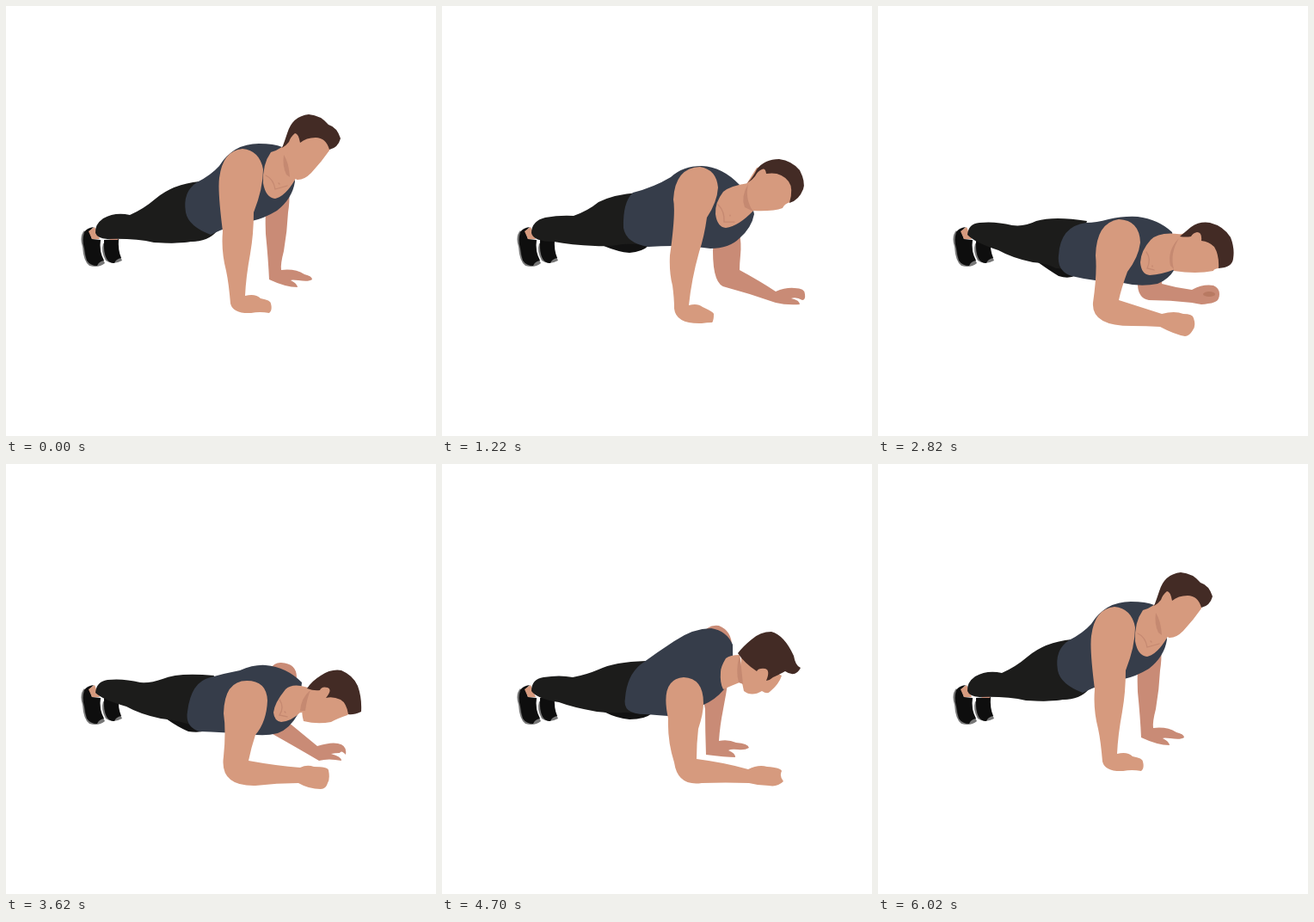
An HTML page without scripts for the animation above (6540 ms loop, 500 by 500 pixels).

```html
<!DOCTYPE html>
<html lang="en">
<head>
<meta charset="utf-8">
<title>Up-down plank</title>
<style>
html, body { margin: 0; width: 100%; height: 100%; overflow: hidden; background: #fff; }
svg { display: block; width: 100%; height: 100%; }
:root {
  --lower: cubic-bezier(.45,.2,.85,.8);
  --push: cubic-bezier(.5,.1,.8,.7);
  --settle: cubic-bezier(.2,.4,.5,1);
  --rise: cubic-bezier(.45,.1,.55,.95);
}
.move { animation: 6540ms linear infinite; }
.skin { fill: #d69a7e; }
.far-skin { fill: #c98b76; }
.shade { fill: #c58971; }
.pants { fill: #1c1c1b; }
.far-pants { fill: #121212; }
.shirt { fill: #363d4a; }
.hair { fill: #432b25; }
.shoe { fill: #0e0e0e; }
.sole { fill: #777; }
.collar { fill: none; stroke: #c58971; stroke-width: 1.3; stroke-linecap: round; }

#farArm { animation-name: far-arm; }
#farLeg { animation-name: far-leg; }
#leg { animation-name: leg; }
#torso { animation-name: torso; }
#chest { animation-name: chest; }
#collar { animation-name: collar; }
#face { animation-name: face; }
#jaw { animation-name: jaw; }
#hair { animation-name: hair; }
#arm { animation-name: arm; }
#fist { animation-name: fist; }

@keyframes far-arm {
  0%, 3.98%, 92.05%, to { d: path("M306 318Q305 295 302 265Q301 240 303 220Q308 200 325 202Q332 215 328 240Q327 262 323 285Q319 300 320 307Q336 305 347 312Q356 314 356 318Q352 321 340 319Q332 318 331 319Q338 322 339 327Q325 327 306 318Z"); animation-timing-function: var(--lower); }
  18.65% { d: path("M388 345Q360 335 330 327Q315 325 315 285Q316 250 335 240Q350 260 347 290Q346 300 346 307Q370 320 388 332Q400 327 410 328Q422 328 422 335Q423 342 419 342Q412 338 406 340Q416 342 416 347Q400 348 388 345Z"); }
  33.33% { d: path("M385 347Q360 345 330 346Q308 345 308 300Q312 270 325 260Q340 270 340 300Q339 315 340 323Q362 328 385 331Q396 325 404 327Q413 331 412 337Q413 343 408 344Q404 347 400 347Q396 348 394 347Q390 347 385 347Z"); }
  43.12% { d: path("M365 345Q340 342 315 342Q303 340 302 325Q300 300 310 290Q330 300 330 320Q330 320 330 323Q348 328 365 330Q378 323 390 325Q397 328 397 335Q397 342 392 344Q388 346 384 346Q380 347 376 347Q370 346 365 345Z"); animation-timing-function: var(--push); }
  55.35% { d: path("M364 345Q335 328 310 314Q290 300 300 260Q305 230 320 231Q338 232 338 248Q340 280 328 300Q345 314 362 328Q378 323 386 325Q397 327 395 338Q390 332 388 336Q383 336 378 337Q390 340 390 345Q375 342 364 345Z"); animation-timing-function: var(--settle); }
  71.87% { d: path("M307 338Q306 310 306 285Q296 240 302 200Q308 186 322 188Q337 194 337 212Q334 250 327 285Q323 305 322 322Q333 320 342 324Q356 325 357 330Q352 333 344 332Q336 331 333 333Q341 336 341 341Q330 341 307 338Z"); animation-timing-function: var(--rise); }
}
@keyframes far-leg {
  0%, 3.98%, 92.05%, to { d: path("M178 275Q200 277 222 273Q236 270 242 262L225 250Z"); animation-timing-function: var(--lower); }
  18.65% { d: path("M188 279Q205 286 218 287Q233 286 241 278L225 265Z"); }
  33.33% { d: path("M192 288Q205 299 220 299Q234 297 238 293L225 275Z"); }
  43.12% { d: path("M186 298Q200 308 210 314Q222 318 230 313L225 285Z"); animation-timing-function: var(--push); }
  55.35% { d: path("M186 296Q200 306 212 311Q224 313 232 310L225 285Z"); animation-timing-function: var(--settle); }
  71.87% { d: path("M188 288Q204 296 218 297Q236 297 244 290L225 275Z"); animation-timing-function: var(--rise); }
}
@keyframes leg {
  0%, 3.98%, 92.05%, to { d: path("M104 264Q103 254 113 247Q127 239 144 243Q160 236 174 224Q194 207 225 204L245 262Q235 274 215 274Q190 276 172 275Q150 270 118 271Q106 270 104 264Z"); animation-timing-function: var(--lower); }
  18.65% { d: path("M104 264Q104 250 120 246Q137 243 153 244Q170 238 182 228Q200 219 228 217L240 278Q225 276 210 277Q195 280 178 279Q150 278 130 274Q106 274 104 264Z"); }
  33.33% { d: path("M104 264Q104 252 118 249Q138 247 156 250Q168 246 182 239Q200 230 238 230L240 292Q225 288 210 288Q198 291 180 288Q152 283 136 277Q110 274 104 264Z"); }
  43.12% { d: path("M104 266Q105 253 118 252Q136 250 156 255Q170 257 184 250Q205 244 243 250L225 310Q215 305 207 305Q196 299 180 298Q156 293 140 284Q112 275 104 266Z"); animation-timing-function: var(--push); }
  55.35% { d: path("M104 266Q105 253 118 251Q136 249 156 254Q168 255 182 250Q200 242 242 246L225 306Q215 303 207 301Q196 298 180 296Q156 291 140 282Q112 274 104 266Z"); animation-timing-function: var(--settle); }
  71.87% { d: path("M104 264Q104 250 118 248Q137 245 152 248Q168 245 182 239Q200 230 237 229L240 291Q225 289 212 289Q198 290 180 288Q152 283 136 277Q110 273 104 264Z"); animation-timing-function: var(--rise); }
}
@keyframes torso {
  0%, 3.98%, 92.05%, to { d: path("M222 205Q238 197 248 186Q264 160 294 160Q312 160 321 164Q332 182 336 204Q333 224 315 238Q300 247 286 250Q260 255 238 266Q212 256 209 240Q205 216 222 205Z"); animation-timing-function: var(--lower); }
  18.65% { d: path("M222 217Q246 211 266 199Q280 186 302 186Q326 187 346 208Q360 222 363 242Q360 258 346 270Q334 282 312 282Q280 277 240 280Q214 276 211 258Q210 228 222 217Z"); }
  33.33% { d: path("M225 231Q248 228 264 222Q282 211 304 211Q330 212 350 236Q362 252 363 266Q360 282 350 292Q338 305 314 305Q290 300 238 293Q214 288 212 276Q212 246 225 231Z"); }
  43.12% { d: path("M242 252Q254 252 268 248Q286 244 302 245Q326 248 342 263Q346 285 345 306Q338 318 325 323Q305 327 285 322Q250 320 225 314Q208 308 210 290Q212 256 242 252Z"); animation-timing-function: var(--push); }
  55.35% { d: path("M238 248Q256 243 272 240Q288 233 302 234Q326 236 344 254Q342 275 340 290Q330 308 316 313Q300 317 285 314Q250 312 225 311Q208 306 211 288Q215 253 238 248Z"); animation-timing-function: var(--settle); }
  71.87% { d: path("M231 233Q250 219 270 206Q292 191 313 191Q331 194 338 210Q340 235 328 262Q318 274 304 280Q290 290 275 294Q250 292 236 291Q209 291 213 272Q215 246 231 233Z"); animation-timing-function: var(--rise); }
}
@keyframes chest {
  0%, 3.98%, 92.05%, to { d: path("M330 155Q322 166 308 170Q298 184 299 206Q302 223 313 224Q325 221 336 202Q342 195 345 190Z"); animation-timing-function: var(--lower); }
  18.65% { d: path("M356 206Q335 209 327 216Q317 229 318 242Q320 257 330 258Q345 256 362 238Q364 238 366 238Z"); }
  33.33% { d: path("M360 236Q337 237 328 244Q318 255 318 268Q320 284 332 286Q348 284 361 270Q364 271 366 270Z"); }
  43.12% { d: path("M362 267Q328 260 317 272Q306 284 305 298Q306 312 316 313Q330 312 343 307Q344 306 346 306Z"); animation-timing-function: var(--push); }
  55.35% { d: path("M362 264Q335 252 325 262Q312 278 311 289Q312 299 320 300Q332 299 342 289Q345 290 347 286Z"); animation-timing-function: var(--settle); }
  71.87% { d: path("M346 222Q335 222 330 226Q324 236 324 242Q323 255 327 262Q336 258 346 254Q349 255 350 250Z"); animation-timing-function: var(--rise); }
}
@keyframes collar {
  0%, 3.98%, 92.05%, to { d: path("M302 197Q311 201 313 213L327 209M317 206L318 207"); opacity: 1; animation-timing-function: var(--lower); }
  18.65% { d: path("M321 231Q329 239 328 251L340 251M335 243L335 244"); }
  33.33% { d: path("M321 259Q329 267 324 279L337 280M333 272L333 273"); }
  43.12% { d: path("M312 286Q318 294 313 305L321 307M319 302L319 303"); animation-timing-function: var(--push); }
  55.35% { d: path("M318 274Q324 283 318 292L327 294M324 288L325 289"); opacity: 1; animation-timing-function: var(--settle); }
  71.87% { d: path("M328 236Q329 245 328 250L331 251M330 247L330 248"); opacity: 0; animation-timing-function: var(--rise); }
}
@keyframes face {
  0%, 3.98%, 92.05%, to { d: path("M331 147Q348 142 365 152Q378 158 376 168Q367 181 355 194Q346 203 338 202Q326 190 328 170Z"); animation-timing-function: var(--lower); }
  18.65% { d: path("M366 188Q388 183 402 196Q411 210 405 228Q398 230 396 235Q385 239 362 238Q348 226 354 207Z"); }
  33.33% { d: path("M373 223Q394 220 405 232Q412 250 406 265Q398 266 395 272Q380 273 362 270Q350 255 357 238Z"); }
  43.12% { d: path("M367 261Q386 264 394 280Q400 290 396 305Q390 306 390 308Q370 312 344 308Q334 290 350 266Z"); animation-timing-function: var(--push); }
  55.35% { d: path("M368 257Q392 264 399 284Q400 290 397 292Q385 296 378 300Q362 303 346 299Q340 280 354 260Z"); animation-timing-function: var(--settle); }
  71.87% { d: path("M360 225Q380 240 395 246Q392 256 381 265Q378 268 372 264Q360 271 351 264Q346 245 348 222Z"); animation-timing-function: var(--rise); }
}
@keyframes jaw {
  0%, 3.98%, 92.05%, to { d: path("M323 173Q321 186 326 196L330 199Q329 182 323 173Z"); animation-timing-function: var(--lower); }
  18.65% { d: path("M356 207Q347 222 352 234L362 239Q352 225 356 207Z"); }
  33.33% { d: path("M357 238Q348 252 352 265L362 271Q353 255 357 238Z"); }
  43.12% { d: path("M350 270Q336 284 340 302L344 306Q339 288 350 270Z"); animation-timing-function: var(--push); }
  55.35% { d: path("M354 263Q343 272 342 287L348 287Q350 272 354 263Z"); animation-timing-function: var(--settle); }
  71.87% { d: path("M346 222Q341 240 345 254L350 256Q348 235 346 222Z"); animation-timing-function: var(--rise); }
}
@keyframes hair {
  0%, 3.98%, 92.05%, to { d: path("M321 165Q323 160 327 148Q333 128 352 126Q366 127 375 138Q385 141 389 154Q386 165 376 167Q372 153 360 153Q349 153 342 159Q340 148 336 148Q331 152 329 158Q325 163 321 165Z"); animation-timing-function: var(--lower); }
  18.65% { d: path("M355 206Q362 199 366 190Q375 178 392 178Q407 180 416 191Q423 205 420 213Q415 226 404 229Q409 212 403 204Q394 192 377 195Q376 188 372 190Q367 192 364 198Q360 203 355 206Z"); }
  33.33% { d: path("M358 237Q368 232 374 224Q385 214 400 214Q415 217 422 232Q426 243 424 252Q418 266 400 265Q408 252 406 243Q400 230 382 231Q383 222 379 224Q372 228 368 233Q363 237 358 237Z"); }
  43.12% { d: path("M351 268Q358 262 364 257Q374 250 386 252Q402 256 410 269Q415 282 413 294Q412 304 396 305Q397 290 391 280Q385 274 376 273Q377 263 371 263Q366 264 364 268Q358 269 351 268Z"); animation-timing-function: var(--push); }
  55.35% { d: path("M350 261Q356 252 366 246Q378 238 390 240Q404 246 409 258Q414 272 413 288Q404 292 398 291Q396 278 389 274Q380 270 372 272Q380 262 374 260Q367 258 365 263Q358 264 350 261Z"); animation-timing-function: var(--settle); }
  71.87% { d: path("M344 220Q350 212 360 204Q370 195 383 195Q398 199 409 223Q411 235 417 237Q411 249 399 241Q390 246 385 248Q382 251 377 252Q382 240 376 238Q368 237 366 241Q352 232 344 220Z"); animation-timing-function: var(--rise); }
}
@keyframes arm {
  0%, 3.98%, 92.05%, to { d: path("M261 346Q259 322 256 308Q250 285 252 262Q246 215 248 200Q252 168 275 166Q295 168 299 190Q299 212 288 240Q288 265 284 288Q279 315 278 337Q290 334 296 340Q308 342 308 346Q310 354 306 357Q295 355 285 357Q264 358 261 346Z"); animation-timing-function: var(--lower); }
  18.65% { d: path("M270 352Q270 340 268 325Q264 310 265 290Q272 240 269 225Q271 188 300 187Q319 190 321 211Q320 228 308 246Q305 268 299 286Q290 318 287 348Q297 345 303 350Q316 356 316 358Q316 366 314 368Q308 368 302 369Q272 370 270 352Z"); }
  33.33% { d: path("M299 382Q295 366 278 344Q262 324 262 312Q268 280 266 250Q270 216 297 214Q318 218 319 240Q317 256 304 280Q297 300 293 311Q301 338 310 368Q320 365 328 370Q340 374 341 377Q339 382 342 387Q334 390 325 390Q304 388 299 382Z"); }
  43.12% { d: path("M328 373Q312 372 295 372Q248 372 250 345Q255 310 253 290Q254 252 280 248Q304 249 305 275Q303 292 290 309Q283 328 280 342Q305 350 330 358Q345 354 355 358Q366 358 367 363Q370 372 366 377Q362 384 357 384Q345 382 328 373Z"); animation-timing-function: var(--push); }
  55.35% { d: path("M340 371Q315 371 290 374Q248 375 253 340Q256 310 253 290Q254 252 280 252Q303 252 304 275Q303 300 290 315Q285 330 282 345Q315 351 342 353Q350 349 358 352Q374 352 375 356Q377 366 374 371Q372 378 366 378Q352 378 340 371Z"); animation-timing-function: var(--settle); }
  71.87% { d: path("M357 371Q330 370 302 371Q274 375 270 347Q262 322 263 296Q253 250 281 248Q304 249 304 278Q304 290 298 308Q296 325 296 343Q328 347 356 355Q368 349 378 352Q394 353 395 357Q392 363 397 369Q390 376 380 374Q368 374 357 371Z"); animation-timing-function: cubic-bezier(.5,.1,.7,.7); }
  81.96% { d: path("M296 370Q290 355 273 332Q257 312 258 300Q262 270 260 242Q260 206 284 204Q305 206 307 232Q304 248 294 272Q288 290 287 302Q294 330 304 359Q314 356 323 361Q336 364 337 368Q336 374 338 378Q330 380 320 380Q301 378 296 370Z"); animation-timing-function: cubic-bezier(.3,.3,.5,.95); }
}
@keyframes fist {
  0%, 22%, 55.35%, to { transform: translate(400px, 337px); opacity: 0; }
  33.33% { transform: translate(400px, 337px); opacity: 1; }
  43.12% { transform: translate(385px, 335px); opacity: 1; }
}
</style>
</head>
<body>
<svg viewBox="0 0 500 500">
  <path id="farArm" class="move far-skin"/>
  <ellipse id="fist" class="move" rx="7" ry="3" fill="#b87a63"/>

  <path class="sole" d="M113 276Q110 286 116 296Q124 302 135 296L128 280Z"/>
  <path class="shoe" d="M114 272L131 271Q130 284 134 293Q128 294 126 299Q120 299 117 294Q113 286 114 272Z"/>
  <path class="far-skin" d="M119 268L131 268L130 272L121 272Z"/>
  <path class="sole" d="M91 261Q85 268 89 280Q90 297 97 302Q108 305 115 299L105 280Z"/>
  <path class="shoe" d="M91 263Q94 258 102 257L97 262L100 271L110 272Q108 285 114 296Q108 297 106 302Q98 302 94 296Q92 290 91 282Q88 272 91 263Z"/>
  <path class="skin" d="M96 262L103 257L109 271L100 271Z"/>

  <path id="farLeg" class="move far-pants"/>
  <path id="leg" class="move pants"/>
  <path id="torso" class="move shirt"/>
  <path id="chest" class="move skin"/>
  <path id="collar" class="move collar"/>
  <path id="face" class="move skin"/>
  <path id="jaw" class="move shade"/>
  <path id="hair" class="move hair"/>
  <path id="arm" class="move skin"/>
</svg>
</body>
</html>
```
